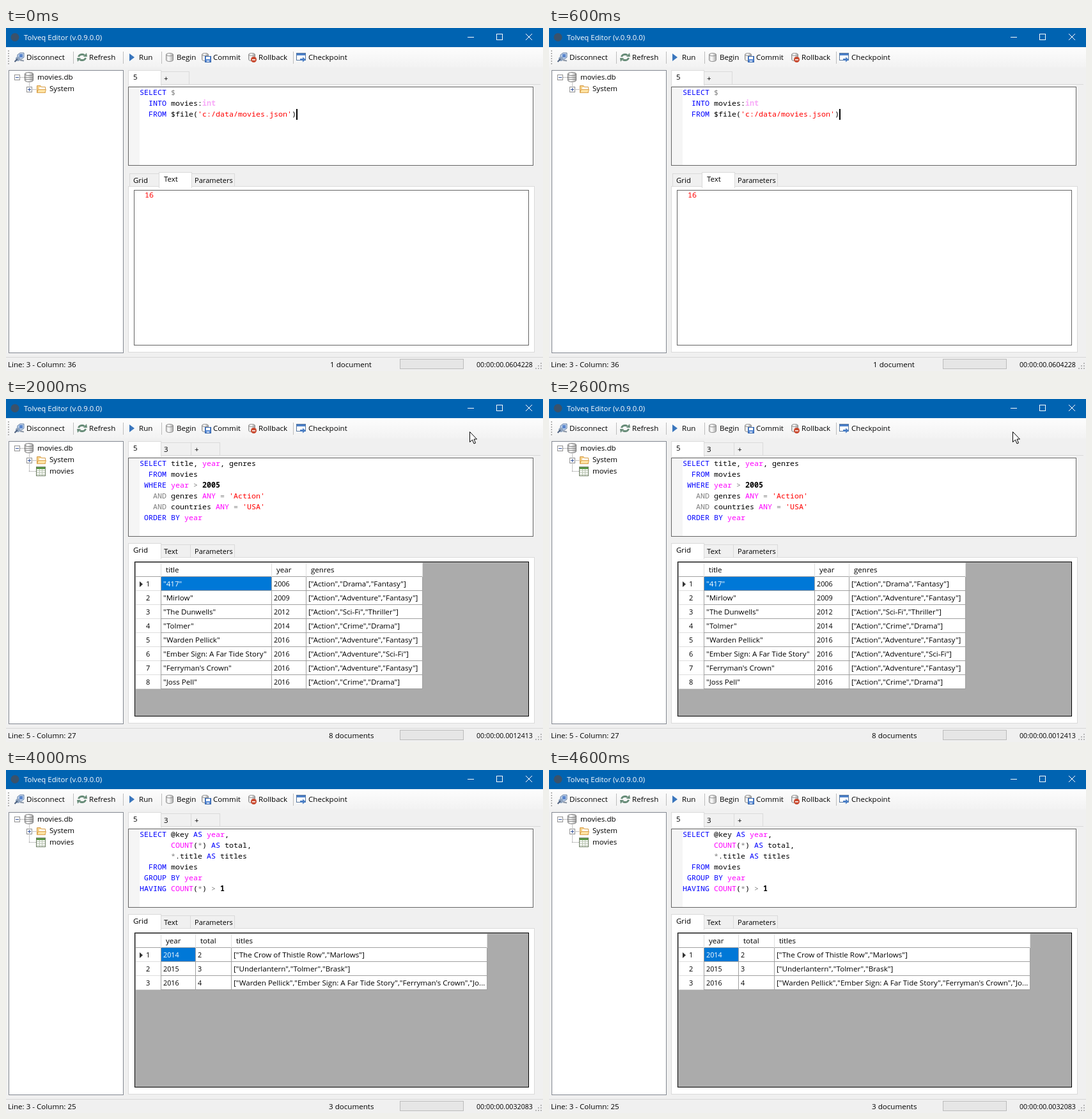
An HTML page with a canvas for the animation above (5 s loop, 840 by 538 pixels).

```html
<!DOCTYPE html>
<html lang="en">
<head>
<meta charset="utf-8">
<title>Query editor</title>
<style>
  html, body { margin: 0; width: 100%; height: 100%; overflow: hidden; background: #f0f0f0; }
  canvas { display: block; }
</style>
</head>
<body>
<canvas id="stage" width="840" height="538"></canvas>
<script>
const ctx = document.getElementById('stage').getContext('2d');
const UI = '"Open Sans", "Noto Sans", sans-serif';
const MONO = '"Noto Sans Mono", "DejaVu Sans Mono", monospace';
const LIST = '"Liberation Sans", sans-serif';
const BLUE = '#0078d7';

// ---------- content ----------
const intoQuery = ["SELECT $", "  INTO movies:int", "  FROM $file('c:/data/movies.json')"];
const filterQuery = [
  "SELECT title, year, genres", "  FROM movies", " WHERE year > 2005",
  "   AND genres ANY = 'Action'", "   AND countries ANY = 'USA'", " ORDER BY year"
];
const partQuery = ["SELECT @key, COUNT(*)", "  FROM movies", " WHERE "];
const groupQuery = [
  "SELECT @key AS year,", "       COUNT(*) AS total,", "       *.title AS titles",
  "  FROM movies", " GROUP BY year", "HAVING COUNT(*) > 1"
];

const list = (...items) => JSON.stringify(items);
const movie = (title, year, ...genres) => [`"${title}"`, year, list('Action', ...genres)];

const films = {
  cols: [['title', 173], ['year', 54], ['genres', 182]],
  rows: [
    movie('417', '2006', 'Drama', 'Fantasy'),
    movie('Mirlow', '2009', 'Adventure', 'Fantasy'),
    movie('The Dunwells', '2012', 'Sci-Fi', 'Thriller'),
    movie('Tolmer', '2014', 'Crime', 'Drama'),
    movie('Warden Pellick', '2016', 'Adventure', 'Fantasy'),
    movie('Ember Sign: A Far Tide Story', '2016', 'Adventure', 'Sci-Fi'),
    movie("Ferryman's Crown", '2016', 'Adventure', 'Fantasy'),
    movie('Joss Pell', '2016', 'Crime', 'Drama')
  ]
};
const totals = {
  cols: [['year', 54], ['total', 56], ['titles', 400]],
  rows: [
    ['2014', '2', list('The Crow of Thistle Row', 'Marlows')],
    ['2015', '3', list('Underlantern', 'Tolmer', 'Brask')],
    ['2016', '4', list('Warden Pellick', 'Ember Sign: A Far Tide Story', "Ferryman's Crown", 'Joss Pell')]
  ]
};

const scenes = [
  { query: intoQuery, caret: [454, 127], pos: '3 - Column: 36', docs: '1 document', time: '0604228' },
  { query: intoQuery, caret: [454, 127], table: true, pos: '3 - Column: 36', docs: '1 document', time: '0604228' },
  { query: filterQuery, grid: films, table: true, pointer: [725, 51], pos: '5 - Column: 27', docs: '8 documents', time: '0012413' },
  { query: partQuery, grid: films, table: true, caret: [258, 127], popup: true, pos: '3 - Column: 8', docs: '8 documents', time: '0012413' },
  { query: groupQuery, grid: totals, table: true, pos: '3 - Column: 25', docs: '3 documents', time: '0032083' }
];

// ---------- helpers ----------
function rect(x, y, w, h, fill) {
  ctx.fillStyle = fill;
  ctx.fillRect(x, y, w, h);
}
function box(x, y, w, h, fill, edge) {
  rect(x, y, w, h, edge);
  rect(x + 1, y + 1, w - 2, h - 2, fill);
}
function text(str, x, y, { size = 11.6, color = '#000', font = UI, weight = '' } = {}) {
  ctx.font = `${weight} ${size}px ${font}`;
  ctx.fillStyle = color;
  ctx.fillText(str, x, y);
}
function poly(points, fill, edge) {
  ctx.beginPath();
  points.forEach(([x, y]) => ctx.lineTo(x, y));
  ctx.closePath();
  ctx.fillStyle = fill;
  ctx.fill();
  if (edge) {
    ctx.strokeStyle = edge;
    ctx.lineWidth = 1;
    ctx.stroke();
  }
}
function line(points, color, width = 1) {
  ctx.beginPath();
  points.forEach(([x, y]) => ctx.lineTo(x, y));
  ctx.strokeStyle = color;
  ctx.lineWidth = width;
  ctx.stroke();
}
function disc(x, y, r, fill) {
  ctx.beginPath();
  ctx.arc(x, y, r, 0, Math.PI * 2);
  ctx.fillStyle = fill;
  ctx.fill();
}
function dots(x, y, dx, dy, n) {
  for (let i = 0; i < n; i++) rect(x + dx * i, y + dy * i, 1, 1, '#8c8c8c');
}
function fit(str, width) {
  ctx.font = `11.6px ${UI}`;
  if (ctx.measureText(str).width <= width) return str;
  while (ctx.measureText(str + '...').width > width) str = str.slice(0, -1);
  return str + '...';
}

// ---------- icons ----------
function cylinder(x, y, w, h, edge = '#8f8f8f') {
  const c = x + w / 2, r = w / 2, k = w / 5;
  const shade = ctx.createLinearGradient(x, 0, x + w, 0);
  shade.addColorStop(0, '#c9c9c9');
  shade.addColorStop(0.35, '#ffffff');
  shade.addColorStop(1, '#a8a8a8');
  ctx.lineWidth = 1;
  ctx.strokeStyle = edge;
  ctx.beginPath();
  ctx.ellipse(c, y + k, r, k, 0, Math.PI, 0);
  ctx.ellipse(c, y + h - k, r, k, 0, 0, Math.PI);
  ctx.closePath();
  ctx.fillStyle = shade;
  ctx.fill();
  ctx.stroke();
  ctx.beginPath();
  ctx.ellipse(c, y + k, r, k, 0, 0, Math.PI);
  ctx.stroke();
}
function plugIcon() {
  poly([[18, 42], [22, 39], [28, 39], [28, 46], [24, 49], [18, 49]], '#b9cde8', '#6a84a8');
  rect(21, 41, 5, 5, '#5a86cc');
  disc(18.5, 48.5, 3.5, '#8ea3bf');
  line([[13.5, 53], [18, 48.5]], '#4c5f7d', 2);
  line([[22, 50.5], [28, 51.5]], '#8d97a6', 2);
}
function refreshIcon() {
  ctx.strokeStyle = '#668b77';
  ctx.lineWidth = 3;
  for (const a of [Math.PI, 0]) {
    ctx.beginPath();
    ctx.ellipse(119, 46, 5.5, 4.5, 0, a + 0.15, a + 2.3);
    ctx.stroke();
  }
  poly([[121, 45], [127, 45], [126, 39]], '#668b77');
  poly([[111, 47], [117, 47], [112, 53]], '#668b77');
}
function saveIcon() {
  cylinder(306.5, 39.5, 10, 12);
  box(311, 44, 10, 10, '#5689d4', '#2f5fa8');
  rect(313, 45, 6, 4, '#fff');
  rect(314, 51, 4, 2, '#d9e5f7');
}
function undoIcon() {
  cylinder(379.5, 39.5, 10, 12);
  disc(387.5, 49.5, 4.5, '#c8492f');
  rect(385, 49, 5, 1.5, '#fff');
}
function windowIcon() {
  box(454, 39, 15, 12, '#fff', '#53749f');
  rect(455, 40, 13, 3, '#4c80c9');
  poly([[460, 48], [464, 48], [464, 45.5], [469, 49.5], [464, 53.5], [464, 51], [460, 51]], '#4b7fc5');
}
function folderIcon() {
  poly([[48.5, 90.5], [54, 90.5], [55.5, 92.5], [61.5, 92.5], [61.5, 101.5], [48.5, 101.5]], '#f7d28a', '#d39a47');
  rect(52, 93, 9, 3, '#fff');
  poly([[50.5, 96.5], [62.5, 96.5], [61, 101.5], [48.5, 101.5]], '#ffe3a3', '#dba24c');
}
function tableIcon() {
  box(47, 106, 15, 15, '#fff', '#6c7d62');
  rect(48, 107, 13, 3, '#5e9a4a');
  for (let i = 0; i < 3; i++) rect(48, 112 + i * 3, 13, 1, '#b8c4b0');
  for (let i = 0; i < 2; i++) rect(52 + i * 4, 110, 1, 10, '#b8c4b0');
}
function expander(x, y, closed) {
  box(x - 4, y - 4, 9, 9, '#fff', '#919191');
  rect(x - 2, y, 5, 1, '#34539c');
  if (closed) rect(x, y - 2, 1, 5, '#34539c');
}

// ---------- window parts ----------
function titleBar() {
  rect(0, 0, 840, 30, '#0063b1');
  disc(14, 14.5, 6.5, '#3a526b');
  text('Tolveq Editor (v.0.9.0.0)', 28, 19, { size: 11.4, color: '#fff' });
  rect(722, 14, 10, 1, '#fff');
  box(767, 9, 10, 10, '#0063b1', '#fff');
  line([[813, 9], [823, 19]], '#fff');
  line([[823, 9], [813, 19]], '#fff');
}
function toolBar() {
  const shade = ctx.createLinearGradient(0, 30, 0, 62);
  shade.addColorStop(0, '#fdfdfd');
  shade.addColorStop(1, '#f2f2f2');
  rect(0, 30, 840, 32, shade);
  for (let y = 35; y < 56; y += 4) rect(3, y, 2, 2, '#b4b4b4');
  for (const x of [105, 183, 243, 449]) rect(x, 37, 1, 19, '#bdbdbd');
  plugIcon();
  refreshIcon();
  poly([[193, 40], [201, 46], [193, 52]], '#3a76bd');
  cylinder(250.5, 39.5, 11, 13);
  saveIcon();
  undoIcon();
  windowIcon();
  const labels = { Disconnect: 32, Refresh: 130, Run: 208, Begin: 267, Commit: 324, Rollback: 395, Checkpoint: 473 };
  for (const name in labels) text(name, labels[name], 50);
}
function tree(hasTable) {
  box(4, 66, 180, 444, '#fff', '#828790');
  dots(22, 77, 2, 0, 4);
  dots(36, 86, 0, 2, 4);
  dots(42, 96, 2, 0, 3);
  expander(17, 77, false);
  cylinder(29.5, 69.5, 13, 15, '#777');
  line([[30, 77.5], [42, 77.5]], '#8a8a8a');
  line([[30, 80.5], [42, 80.5]], '#8a8a8a');
  expander(36, 96, true);
  folderIcon();
  text('movies.db', 49, 81);
  text('System', 68, 99);
  if (!hasTable) return;
  dots(36, 102, 0, 2, 6);
  dots(36, 113, 2, 0, 6);
  tableIcon();
  text('movies', 68, 117);
}
// Each tab is [label, left, right, text x].
function tabs(items, active, top) {
  items.forEach(([label, left, right, tx], i) => {
    const on = i === active, y = on ? top : top + 2;
    box(left, y, right - left + 1, on ? 25 : 21, on ? '#fff' : '#f0f0f0', '#dadada');
    if (on) rect(left + 1, top + 22, right - left - 1, 3, '#fff');
    text(label, tx, top + (on ? 15 : 17), { size: label === 'Parameters' ? 11.1 : 11.5 });
  });
}

const KEYWORD = /^(SELECT|INTO|FROM|WHERE|ORDER|BY|AS|GROUP|HAVING)$/;
function style(token) {
  if (KEYWORD.test(token)) return { color: '#0000ff' };
  if (/^(year|ANY|COUNT)$/.test(token)) return { color: '#ff00ff' };
  if (/^(AND|[*=>$])$/.test(token)) return { color: '#808080' };
  if (token === 'int') return { color: '#f8aaf8', weight: 'bold' };
  if (token[0] === "'") return { color: '#ff0000' };
  if (/^\d+$/.test(token)) return { weight: 'bold' };
  return {};
}
function code(lines) {
  lines.forEach((str, row) => {
    for (const m of str.matchAll(/'[^']*'|[$@]?\w+|\S/g)) {
      text(m[0], 209 + m.index * 7, 105 + row * 17, { size: 11.667, font: MONO, ...style(m[0]) });
    }
  });
}
function editor(s) {
  rect(191, 88, 645, 1, '#dadada');
  const top = [['5', 191, 242, 199]];
  if (s.grid) top.push(['3', 242, 289, 247], ['+', 289, 334, 295]);
  else top.push(['+', 242, 286, 247]);
  tabs(top, 0, 66);
  box(191, 92, 634, 124, '#fff', '#646464');
  rect(192, 93, 17, 122, '#f5f5f5');
  code(s.query);
  if (s.caret) rect(...s.caret, 2, 17, '#000');
}
function grid({ cols, rows }) {
  box(201, 255, 617, 243, '#ababab', '#000');
  const width = cols.reduce((sum, c) => sum + c[1], 40);
  rect(203, 257, width, 22 + rows.length * 22, '#fff');
  rect(203, 278, width, 1, '#a0a0a0');
  rect(242, 257, 1, 22, '#dedede');
  rows.forEach((r, i) => {
    const y = 279 + i * 22;
    rect(203, y + 21, 39, 1, '#dedede');
    rect(242, y + 21, width - 39, 1, '#a0a0a0');
    text(i + 1, 219, y + 15, { size: 11 });
  });
  rect(242, 279, 1, rows.length * 22, '#a0a0a0');
  poly([[209, 286], [214, 290.5], [209, 295]], '#333');
  let x = 242;
  cols.forEach(([name, w], c) => {
    text(name, x + 8, 272);
    rect(x + w, 257, 1, 22, '#dedede');
    rect(x + w, 279, 1, rows.length * 22, '#a0a0a0');
    if (c === 0) rect(x + 1, 279, w - 1, 21, BLUE);
    rows.forEach((r, i) => {
      const size = /^\d+$/.test(r[c]) ? 10.8 : 11.6;
      text(fit(r[c], w - 6), x + 4, 294 + i * 22, { size, color: c + i ? '#000' : '#fff' });
    });
    x += w;
  });
}
function results(s) {
  box(191, 248, 636, 261, '#fff', '#dadada');
  if (s.grid) {
    tabs([['Grid', 191, 242, 199], ['Text', 242, 288, 247], ['Parameters', 288, 357, 295]], 0, 226);
    grid(s.grid);
  } else {
    tabs([['Grid', 193, 239, 199], ['Text', 239, 290, 247], ['Parameters', 290, 357, 295]], 1, 226);
    box(200, 254, 618, 244, '#fff', '#646464');
    text('16', 217, 266, { size: 11.667, font: MONO, color: '#ff0000' });
  }
}
function statusBar(s) {
  rect(0, 516, 840, 1, '#d7d7d7');
  text('Line: ' + s.pos, 3, 532);
  text(s.docs, s.grid ? 505 : 507, 532);
  box(616, 519, 100, 16, '#e6e6e6', '#bcbcbc');
  text('00:00:00.' + s.time, 736, 532, { size: 10.7 });
  for (let i = 0; i < 3; i++) {
    for (let j = 0; j <= i; j++) rect(836 - j * 4, 525 + i * 4, 2, 2, '#b5b5b5');
  }
}
function shadowed(draw) {
  ctx.save();
  ctx.shadowColor = 'rgba(0,0,0,0.55)';
  ctx.shadowBlur = 4;
  ctx.shadowOffsetX = ctx.shadowOffsetY = 2;
  draw();
  ctx.restore();
}
function popup() {
  shadowed(() => rect(258, 145, 201, 200, '#fff'));
  const words = ['BINARY*', 'BOOL*', 'BOOLEAN*', 'BY', 'CHECK', 'CHECKPOINT', 'COALESCE*', 'COLLECTION', 'COMMIT', 'CONCAT*'];
  words.forEach((word, i) => {
    const y = 155 + i * 20, last = i === words.length - 1;
    if (last) rect(279, y - 10, 161, 18, BLUE);
    if (word.endsWith('*')) {
      poly([[272, y - 5], [277, y], [272, y + 5], [267, y]], '#a54bb0');
      poly([[272, y - 5], [277, y], [272, y + 1], [267, y]], '#cf8fd6');
      for (let k = -2; k <= 2; k += 2) rect(264, y + k, 3, 1, '#b9b9c9');
    } else {
      for (let k = 0; k < 4; k++) rect(263, y - 5 + k * 3, k % 2 ? 12 : 9, 2, k % 2 ? '#2c62b8' : '#6a93d4');
    }
    text(word.replace('*', ''), 283, y + 4, { size: 11, font: LIST, color: last ? '#fff' : '#000' });
  });
  rect(441, 145, 17, 200, '#f0f0f0');
  rect(442, 181, 15, 17, '#cdcdcd');
  line([[446, 155], [449.5, 151.5], [453, 155]], '#505050', 1.6);
  line([[446, 334], [449.5, 337.5], [453, 334]], '#505050', 1.6);

  shadowed(() => rect(458, 144, 130, 32, '#646464'));
  rect(459, 145, 128, 30, '#ffffe1');
  const tip = { size: 10.7, font: LIST };
  text('Method:', 460, 156, tip);
  text('-', 460, 173, tip);
  text('CONCAT(first, second)', 472, 173, { ...tip, size: 10.5 });
}
function pointer([x, y]) {
  ctx.save();
  ctx.translate(x + 0.5, y + 0.5);
  poly([[0, 0], [0, 16], [4, 12.5], [6.5, 18.5], [9, 17.5], [6.5, 11.5], [11, 11.5]], '#fff', '#000');
  ctx.restore();
}

function draw(s) {
  rect(0, 0, 840, 538, '#f0f0f0');
  titleBar();
  toolBar();
  tree(s.table);
  editor(s);
  results(s);
  statusBar(s);
  if (s.popup) popup();
  if (s.pointer) pointer(s.pointer);
}

const start = performance.now();
let shown = -1;
function tick() {
  const step = Math.floor((performance.now() - start) / 1000) % scenes.length;
  if (step !== shown) draw(scenes[shown = step]);
  requestAnimationFrame(tick);
}
tick();
</script>
</body>
</html>
```
